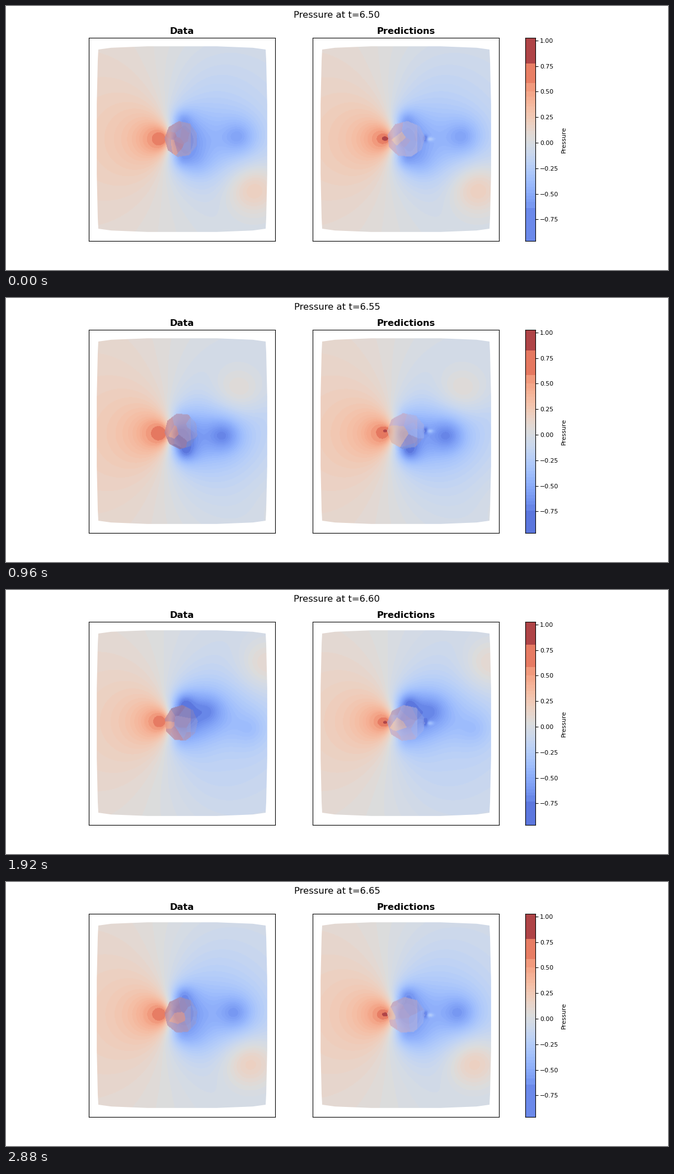
These frames come from a looping animation (1183x473 px, 3.04 s). A matplotlib script:

```python
import numpy as np
import matplotlib.pyplot as plt
from matplotlib.animation import FuncAnimation
from matplotlib.patches import Polygon

W, H = 1183, 473
FRAMES, INTERVAL = 19, 160
HALF = 9.4                      # frames per half shedding cycle
CX, CY = 314.5, 239
P_MIN, P_MAX = -0.961, 1.027
LEFT, TOP, BOTTOM, PANEL_W = 147.9, 56.8, 421.0, 333

plt.rcParams["font.size"] = 9.86
X, Y = np.meshgrid(np.arange(160, 470) + 0.5, np.arange(70, 408) + 0.5)
CMAP = plt.get_cmap("coolwarm")

# One quarter of the domain outline, mirrored into the other three.
CORNER = np.array([(62, 166.3), (126.5, 163.7), (149.5, 160.5), (150.5, 141), (152.3, 62)])
OUTLINE = np.concatenate([CORNER, CORNER[::-1] * (1, -1),
                          -CORNER, CORNER[::-1] * (-1, 1)]) + (CX, CY - .5)


def spread(x, y, sx, sy):
    return ((X - x) / sx) ** 2 + ((Y - y) / sy) ** 2


def blob(x, y, sx, sy):
    return np.exp(-spread(x, y, sx, sy) / 2)


def vortex(x, y, size):
    """Low-pressure core with a long tail."""
    return (1 + spread(x, y, size, size)) ** -1.5


def bell(t, centre, width):
    return np.exp(-((t - centre) / width) ** 2)


def cycle(t, peak, period=2 * HALF):
    return np.cos(2 * np.pi * (t - peak) / period)


def street(k, side):
    """Pressure of the vortices shed on one side (+1 below, -1 above)."""
    t = (k + (HALF if side < 0 else 0) + 3) % (2 * HALF) - 3
    swing = cycle(t, 5)
    drift = 4 + .55 * min(abs(t - 8.5), 8.2) ** 2
    p = -.43 * bell(t, 6, 6) * vortex(341 + 8 * t, CY + side * drift, 38)
    p += .30 * bell(t, 9, 5) * blob(360 + 8.7 * t, CY - side * (32 + 6 * t), 34, 32)
    p -= (.25 + .20 * swing) * vortex(314 + 6 * swing, CY + side * 36, 23)
    return p - .03 * (1 - cycle(t, 0)) * blob(365, CY + side * 85, 65, 60)


def pressure(k, predicted):
    core = 18 if predicted else 16
    dx, dy = X - 294, Y - CY - 4.5 * cycle(k, 5)
    p = .03 + .02 * cycle(k, 4) - 24 * dx / (dx ** 2 + dy ** 2 + core ** 2)
    p += street(k, 1) + street(k, -1) - .05 * blob(405, CY, 55, 38)
    if predicted:
        p += .25 * blob(279, CY - 1, 7, 4)
        p += .25 * blob(357, CY, 5, 2.5) - .3 * blob(350, CY - 1, 3, 4)
    return p


def band_levels(k):
    low = -.71 - .07 * cycle(k, 4.4, HALF)
    high = .80 + .03 * cycle(k, 5, HALF)
    fine = np.arange(low + .06, .44, .03)
    return np.concatenate([[P_MIN, low], fine, [.45, .50, .58, high, P_MAX]])


def shade(p, levels):
    band = np.clip(np.digitize(p, levels) - 1, 0, len(levels) - 2)
    mid = (levels[:-1] + levels[1:]) / 2
    mid[0] = levels[1] - .05
    colors = CMAP((mid - P_MIN) / (P_MAX - P_MIN))[:, :3] * .94 + .05
    colors[-1] = (.69, .27, .28)
    return colors[band]


def add_body(image, k, predicted):
    """Overlay the translucent faceted cylinder."""
    rng = np.random.default_rng(40 + 2 * k + predicted)
    cx, rx = (315, 33) if predicted else (313, 29)
    u, v = (X - cx) / rx, (Y - CY) / 31.5
    angles = rng.uniform(0, 1) + np.arange(9) * 2 * np.pi / 9
    inside = np.max([u * np.cos(a) + v * np.sin(a) for a in angles], axis=0) < .97
    if predicted:
        inside |= (u > 0) & (u + 1.2 * np.abs(v) < 1.06)

    seeds = rng.uniform(-1, 1, (15, 2))
    cell = np.argmin([(u - a) ** 2 + (v - b) ** 2 for a, b in seeds], axis=0)
    warm, cool = (((.80, .66, .74), (.66, .71, .92)) if predicted
                  else ((.76, .53, .58), (.62, .64, .83)))
    mix = np.clip(.45 + .5 * seeds[:, 0] + rng.normal(0, .16, 15), 0, 1)[:, None]
    facets = np.array(warm) * (1 - mix) + np.array(cool) * mix
    front = np.argmin(np.hypot(seeds[:, 0] + .6, seeds[:, 1] - .2))
    facets[front] = (.90, .74, .68) if predicted else (.90, .60, .52)
    shadow = np.clip(cycle(k, 5) * seeds[:, 1], 0, 1)[:, None]
    facets -= .14 * shadow * np.array([1.3, 1, .5])
    alpha = (np.where(u > .6, .4, .75) * inside)[..., None]
    return image * (1 - alpha) + facets[cell] * alpha


def panel_image(k, predicted):
    image = shade(pressure(k, predicted), band_levels(k))
    return np.clip(add_body(image, k, predicted), 0, 1)


def bar_image(k):
    return shade(np.linspace(P_MAX, P_MIN, 364), band_levels(k))[:, None, :]


def make_panel(left, title):
    ax = fig.add_axes([left / W, 1 - BOTTOM / H, PANEL_W / W, (BOTTOM - TOP) / H])
    image = ax.imshow(np.ones(X.shape + (3,)), extent=(160, 470, 408, 70),
                      aspect="auto", interpolation="bilinear")
    outline = Polygon(OUTLINE, facecolor="none", edgecolor="none")
    ax.add_patch(outline)
    image.set_clip_path(outline)
    ax.set(xlim=(LEFT, LEFT + PANEL_W), ylim=(BOTTOM, TOP), xticks=[], yticks=[])
    ax.set_title(title, fontweight="bold", pad=5)
    return image


fig = plt.figure(figsize=(W / 100, H / 100), dpi=100)
heading = fig.suptitle("")
panels = [make_panel(LEFT, "Data"), make_panel(LEFT + 400, "Predictions")]

bar_ax = fig.add_axes([927.5 / W, 1 - BOTTOM / H, 18 / W, (BOTTOM - TOP) / H])
bar = bar_ax.imshow(np.ones((364, 1, 3)), extent=(0, 1, P_MIN, P_MAX),
                    aspect="auto", interpolation="nearest")
bar_ax.set_xticks([])
bar_ax.set_yticks(np.arange(-.75, 1.01, .25))
bar_ax.yaxis.set_major_formatter("{x:.2f}")
bar_ax.yaxis.tick_right()
bar_ax.yaxis.set_label_position("right")
bar_ax.tick_params(labelsize=7.89, pad=2.8)
bar_ax.set_ylabel("Pressure", fontsize=7.89, labelpad=3)


def update(k):
    heading.set_text(f"Pressure at t={6.5042 + .0083 * k:.2f}")
    for predicted, image in enumerate(panels):
        image.set_data(panel_image(k, predicted))
    bar.set_data(bar_image(k))
    return [heading, bar, *panels]


anim = FuncAnimation(fig, update, frames=FRAMES, interval=INTERVAL,
                     repeat=True, repeat_delay=0)
plt.show()
```
